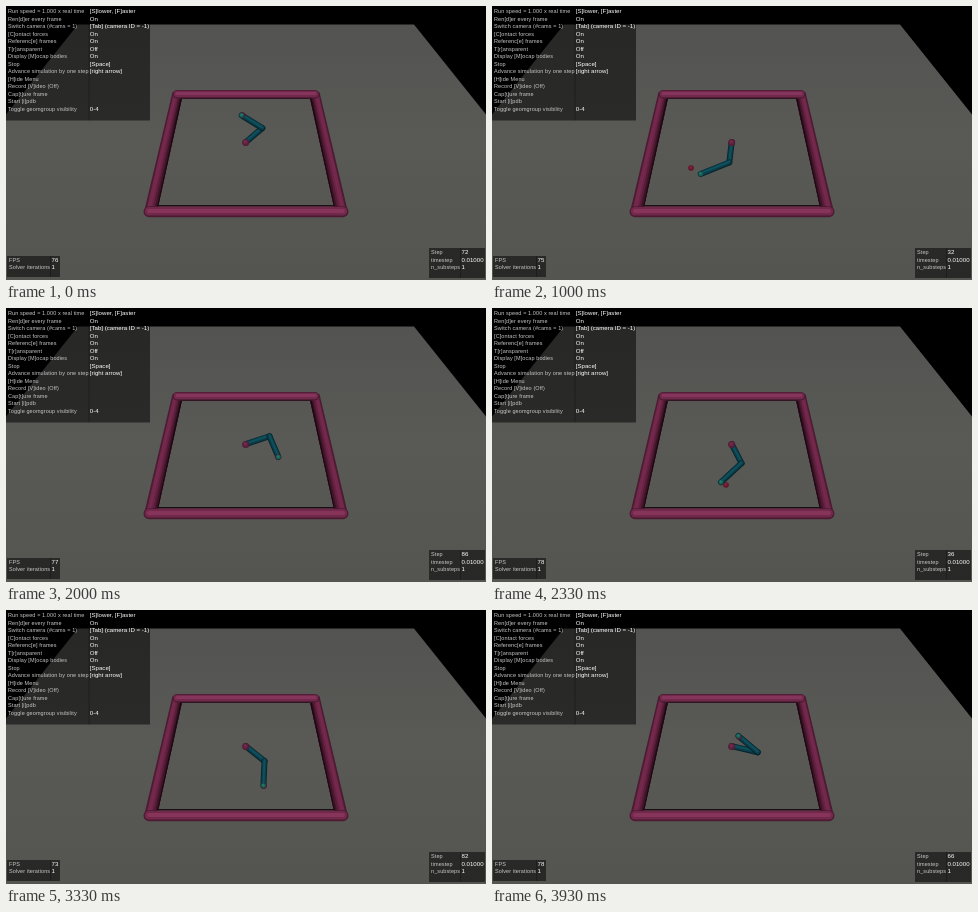
An HTML page with a canvas that plays this animation: 480x274 px, repeating every 3990 ms.

```html
<!DOCTYPE html>
<html lang="en">
<head>
<meta charset="utf-8">
<title>Two-link reacher</title>
<style>
html, body { margin: 0; width: 100%; height: 100%; overflow: hidden; background: #000; }
canvas { display: block; }
</style>
</head>
<body>
<canvas id="stage" width="480" height="274"></canvas>
<script>
const ctx = document.getElementById('stage').getContext('2d');
const LOOP = 3990, EPISODE = 100;

// frame, total simulation steps, frames per second
const clock = [[0, 72, 76], [6, 136, 77], [15, 232, 75], [30, 386, 77],
  [42, 508, 80], [50, 582, 73], [59, 666, 78]];

// q: final joint angles in degrees, settle: steps until the shoulder rests
const episodes = [
  { q: [50, 87], settle: 36, target: [236.5, 109] },
  { q: [111, 89], settle: 34, target: [200, 127.5] },
  { q: [-109, -57], settle: 50, target: [199, 162] },
  { q: [25, -101], settle: 36, target: [272, 149] },
  { q: [-70, -60], settle: 38, target: [234, 177] },
  { q: [-48, -46], settle: 44, target: [258, 176] },
  { q: [-18, 147], settle: 36, target: [247, 127] }
];

const menu = [
  ['Run speed = 1.000 x real time', '[S]lower, [F]aster'],
  ['Ren[d]er every frame', 'On'],
  ['Switch camera (#cams = 1)', '[Tab] (camera ID = -1)'],
  ['[C]ontact forces', 'On'],
  ['Referenc[e] frames', 'On'],
  ['T[r]ansparent', 'Off'],
  ['Display [M]ocap bodies', 'On'],
  ['Stop', '[Space]'],
  ['Advance simulation by one step', '[right arrow]'],
  ['[H]ide Menu', ''],
  ['Record [V]ideo (Off)', ''],
  ['Cap[t]ure frame', ''],
  ['Start [i]pdb', ''],
  ['Toggle geomgroup visibility', '0-4']
];

const clamp = v => Math.min(1, Math.max(0, v));
const easeOut = v => 1 - (1 - clamp(v)) ** 2;
const smooth = v => { v = clamp(v); return v * v * (3 - 2 * v); };
const mix = (a, b, k) => a + (b - a) * k;

function polygon(points, fill) {
  ctx.beginPath();
  points.forEach(p => ctx.lineTo(...p));
  ctx.closePath();
  ctx.fillStyle = fill;
  ctx.fill();
}

// A rounded rod, shaded by ever thinner strokes.
function rod(a, b, layers, lift = 0.4) {
  ctx.lineCap = 'round';
  layers.forEach(([width, color], i) => {
    ctx.beginPath();
    ctx.moveTo(a[0], a[1] - i * lift);
    ctx.lineTo(b[0], b[1] - i * lift);
    ctx.lineWidth = width;
    ctx.strokeStyle = color;
    ctx.stroke();
  });
}

function ball([x, y], r, light, dark) {
  const g = ctx.createRadialGradient(x - r * 0.2, y - r * 0.4, 0, x, y, r);
  g.addColorStop(0, light);
  g.addColorStop(1, dark);
  ctx.beginPath();
  ctx.arc(x, y, r, 0, 7);
  ctx.fillStyle = g;
  ctx.fill();
}

// Arm plane to screen, seen in perspective.
function project(x, y) {
  const depth = 1 + 0.5607 * y;
  return [239.7 + 268.7 * x / depth, (136.2 - 115.7 * y) / depth];
}

function panel(x, y, w, h, rows, valueX, firstY) {
  ctx.fillStyle = 'rgba(0,0,0,.52)';
  ctx.fillRect(x, y, w, h);
  ctx.fillRect(valueX - 1, y, 0.5, h);
  rows.forEach(([label, value], i) => {
    const base = firstY + i * 7.5;
    ctx.font = '5.5px "Liberation Sans", Arial, sans-serif';
    ctx.letterSpacing = '0.1px';
    ctx.fillStyle = '#c8c8c8';
    ctx.fillText(label, x + 2, base);
    ctx.font = '6.1px "Liberation Sans", Arial, sans-serif';
    ctx.letterSpacing = '0px';
    ctx.fillStyle = '#fff';
    ctx.fillText(value, valueX, base);
  });
}

// Side wall in strips from the lit outer edge to the dark inner edge.
function sideWall(mirror) {
  const shades = ['#4d1b32', '#71284b', '#74294d', '#692445', '#561c37', '#3c1426', '#170a10'];
  const n = shades.length;
  const at = (x, y) => [mirror ? 480 - x : x, y];
  shades.forEach((color, i) => polygon([
    at(mix(166.5, 176, i / n), mix(86, 92, i / n)), at(176, 92),
    at(152, 201), at(mix(138, 152, i / n), 206)
  ], color));
}

function drawArena() {
  ctx.fillStyle = '#000';
  ctx.fillRect(0, 0, 480, 274);
  const floor = ctx.createLinearGradient(0, 18, 0, 274);
  floor.addColorStop(0, '#535451');
  floor.addColorStop(0.45, '#595a56');
  floor.addColorStop(1, '#545551');
  polygon([[72, 18.4], [408, 18.4], [480, 108.5], [480, 274], [0, 274], [0, 108.5]], floor);

  sideWall(false);
  sideWall(true);
  ctx.fillStyle = '#171114';
  ctx.fillRect(175, 92, 130, 1);
  ctx.fillRect(152, 199, 176, 1);
  rod([171, 88.3], [309, 88.3], [[8.5, '#4c1a31'], [6.5, '#70284b'], [3, '#85355b']]);
  rod([143, 205.7], [337, 205.7], [[11, '#4c1a31'], [8.5, '#70284b'], [4, '#86345a']]);
}

function drawArm({ q, settle, target }, step) {
  const rad = Math.PI / 180;
  const a = q[0] * rad * easeOut(step / settle);
  const b = a + q[1] * rad * smooth((step - 4) / 24);
  const ex = 0.1 * Math.cos(a), ey = 0.1 * Math.sin(a);
  const base = project(0, 0);
  const elbow = project(ex, ey);
  const tip = project(ex + 0.11 * Math.cos(b), ey + 0.11 * Math.sin(b));
  const skin = [[6, '#09262e'], [4.4, '#0b3d49'], [2, '#0f505d']];

  rod(base, elbow, skin);
  rod(elbow, tip, skin);
  ball(target, 2.8, '#932440', '#541124');
  ball(tip, 2.5, '#248570', '#124c48');
  ball([base[0], base[1] + 0.4], 3.5, '#7f2d52', '#4a1931');
}

function readClock(frame) {
  let i = 0;
  while (i < clock.length - 2 && clock[i + 1][0] <= frame) i++;
  const [f0, s0, r0] = clock[i], [f1, s1, r1] = clock[i + 1];
  const k = (frame - f0) / (f1 - f0);
  return {
    total: 2 * Math.round(mix(s0, s1, k) / 2),
    fps: Math.round(mix(r0, r1, k))
  };
}

function draw(now) {
  const t = now % LOOP, rest = t % 200;
  const frame = 3 * Math.floor(t / 200) + (rest >= 70) + (rest >= 130);
  const { total, fps } = readClock(frame);
  const step = total % EPISODE;

  drawArena();
  drawArm(episodes[Math.floor(total / EPISODE)], step);
  panel(0, 0, 144, 114.5, menu, 83.8, 7);
  panel(1, 250, 53, 21, [['FPS', fps], ['Solver iterations', 1]], 45.5, 255.7);
  panel(423, 242, 56, 30,
    [['Step', step], ['timestep', '0.01000'], ['n_substeps', 1]], 455.5, 248.3);
}

const start = performance.now();
function tick() {
  draw(performance.now() - start);
  requestAnimationFrame(tick);
}
tick();
</script>
</body>
</html>
```
